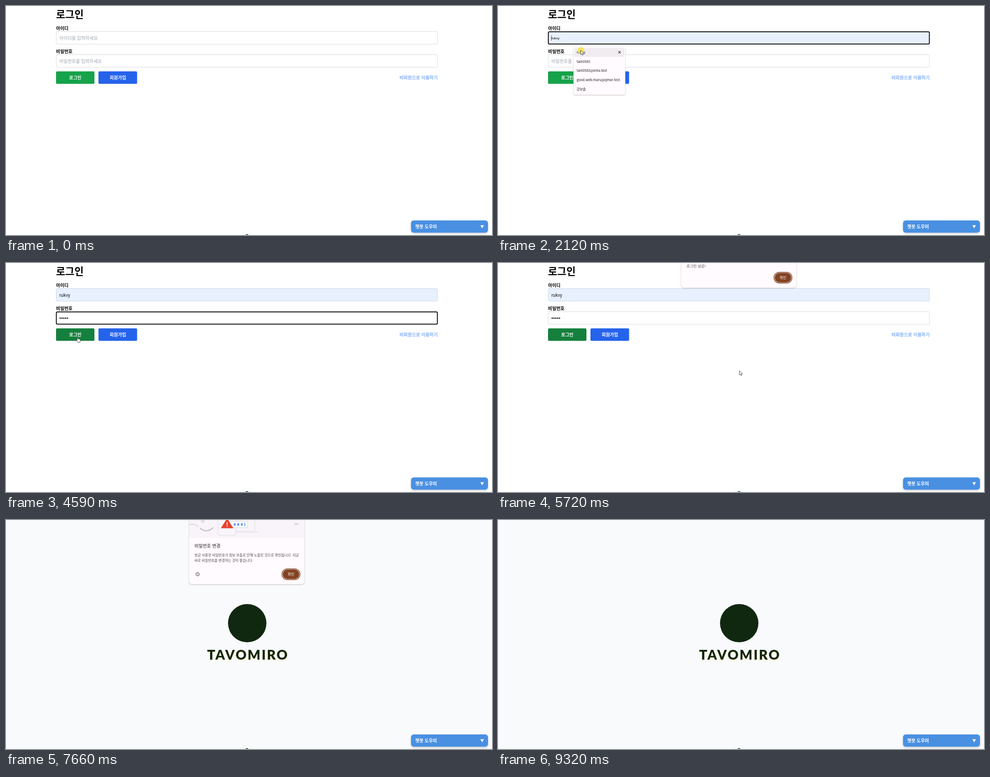
These frames come from a looping animation (1088x515 px, 9.86 s). An HTML page:

```html
<!DOCTYPE html>
<html lang="ko">
<head>
<meta charset="utf-8">
<title>로그인</title>
<style>
  html, body { margin: 0; width: 100%; height: 100%; overflow: hidden; background: #fff; }
  svg { display: block; width: 100%; height: 100%; }
  text { font: 10px "Noto Sans CJK KR", "Noto Sans CJK", "Noto Sans", sans-serif; white-space: pre; }
  .bold { font-weight: 700; }
  .mid { text-anchor: middle; }
  .white { fill: #fff; }
  .hint { fill: #9ca3af; }
  .field { fill: #fff; stroke: #d5d9de; }
  .field.filled { fill: #e8f0fe; stroke: #c9d8e8; }
  .ring { fill: none; stroke: #101014; stroke-width: 2; }
  .caret { stroke: #222; stroke-width: .8; }
  .list text { font-size: 7.5px; fill: #1f1b1f; }
  .panel { fill: #fffbff; }
  .small { font-size: 7.7px; fill: #4d4448; }
  .ok { --pill: #834323; }
  .ok.over { --pill: #925330; }
  .pill { fill: var(--pill); }
  .halo { fill: #fffbff; stroke: #834323; stroke-width: 1.5; }
  .okText { font-size: 8px; fill: #fff; }
  .art { fill: none; stroke: #dcdce0; }
  .brand { font: 900 30px Lato, sans-serif; letter-spacing: 2.5px; fill: #10280f; }
</style>
</head>
<body>
<svg viewBox="0 0 1088 515" preserveAspectRatio="none">
  <defs>
    <filter id="shade" x="-10%" y="-20%" width="120%" height="150%">
      <feDropShadow dx="0" dy="1" stdDeviation="1.3" flood-color="#5c3020" flood-opacity=".4"/>
    </filter>
    <filter id="soft" x="-10%" y="-40%" width="120%" height="200%">
      <feDropShadow dx="0" dy="2" stdDeviation="2.3" flood-color="#000" flood-opacity=".2"/>
    </filter>
    <filter id="glow" x="-10%" y="-30%" width="120%" height="170%">
      <feDropShadow dx="0" dy="2" stdDeviation="1.2" flood-color="#efd98c" flood-opacity=".6"/>
    </filter>
    <clipPath id="banner"><rect x="410" y="-5" width="258" height="45"/></clipPath>
    <g id="okShape">
      <rect class="halo" x="617.8" y="20.8" width="40.4" height="24.4" rx="12.2"/>
      <rect class="pill" x="619.5" y="22.3" width="37" height="21.4" rx="10.7"/>
      <text class="okText mid" x="638" y="35.9">확인</text>
    </g>
  </defs>

  <rect id="back" width="1088" height="515" fill="#fff"/>

  <g id="login">
    <text class="bold" x="112" y="27" style="font-size:22.4px">로그인</text>
    <text class="bold" x="112" y="54">아이디</text>
    <rect id="idField" class="field" x="112.5" y="57.5" width="853.5" height="28.3" rx="2.5"/>
    <text id="idHint" class="hint" x="119.5" y="75.7">아이디를 입력하세요</text>
    <text id="idPreview" x="119.5" y="75.3" style="font:7.5px 'Liberation Sans',sans-serif">rukvy</text>
    <text id="idText" x="119.5" y="75.7" style="font-size:9.3px">rukvy</text>
    <rect id="idRing" class="ring" x="112.7" y="58" width="853" height="27.5" rx="2.5"/>
    <line id="idCaret" class="caret" y1="66.5" y2="78"/>

    <text class="bold" x="112" y="106">비밀번호</text>
    <rect class="field" x="112.5" y="109.5" width="853.5" height="28.3" rx="2.5"/>
    <text id="pwHint" class="hint" x="119.5" y="127.5">비밀번호를 입력하세요</text>
    <g id="dots"></g>
    <rect id="pwRing" class="ring" x="112.7" y="110" width="853" height="27.5" rx="2.5"/>
    <line id="pwCaret" class="caret" y1="118" y2="130"/>

    <rect id="loginBtn" x="112" y="147" width="86" height="28" rx="2.5"/>
    <text class="bold white mid" x="155" y="164.7">로그인</text>
    <rect id="joinBtn" x="207" y="147" width="86.5" height="28" rx="2.5"/>
    <text class="bold white mid" x="250.5" y="164.7">회원가입</text>
    <text x="966.5" y="164.7" text-anchor="end" fill="#3b82f6">비회원으로 이용하기</text>
  </g>

  <g id="home">
    <circle cx="540" cy="232" r="43" fill="#10280f"/>
    <text class="brand mid" x="541.5" y="314" filter="url(#glow)">TAVOMIRO</text>
  </g>

  <circle cx="540" cy="516.5" r="9" fill="#fff" filter="url(#soft)"/>
  <circle cx="539.5" cy="517" r="4" fill="#2c5a50"/>

  <rect x="906.7" y="482.3" width="172.3" height="27.5" rx="6" fill="#4a90e2" filter="url(#soft)"/>
  <text class="bold white" x="916" y="499.8">챗봇 도우미</text>
  <path class="white" d="M1062 493h8l-4 7z"/>

  <g id="list" class="list">
    <rect class="panel" x="169" y="92" width="116" height="107.5" rx="4" filter="url(#shade)"/>
    <g id="firstRow">
      <rect x="171" y="94" width="112" height="20.5" rx="2" fill="#f1ecf0"/>
      <path d="M269.5 101.5l5 5m0-5l-5 5" stroke="#333" stroke-width="1.1"/>
    </g>
  </g>

  <g id="alert">
    <rect class="panel" x="410" y="-20" width="258" height="75.5" rx="7" filter="url(#shade)"/>
    <text class="small" x="422" y="9.8" style="font-size:8.2px">로그인 성공!</text>
    <g id="alertOk" class="ok"><use href="#okShape"/></g>
  </g>

  <g id="advice">
    <rect class="panel" x="410" y="-20" width="258" height="164.5" rx="7" filter="url(#shade)"/>
    <g clip-path="url(#banner)">
      <rect x="410" y="-5" width="258" height="45" fill="#f8f4f9"/>
      <path class="art" stroke-width="2.5" d="M410 11q11-5 20 4"/>
      <path class="art" stroke-width="2.5" style="stroke:#c3c4c8" d="M434 18q15 13 30-1"/>
      <path class="art" stroke-width="1.8" d="M440.5-3v11m-5-8l10 5m0-5l-10 5"/>
      <path d="M645 11q0-5 5-5t5 5z" fill="#dcdce0"/>
      <rect class="art" x="514" y="-8" width="43" height="33"/>
      <path class="art" d="M500 27.5h65"/>
      <rect class="art" x="475" y="-8" width="39" height="42" rx="3" style="fill:#f8f6fa"/>
      <rect x="497" y="3" width="44" height="14" fill="#fff" stroke="#cfd6e4"/>
      <path id="stars" fill="none" stroke="#3f7de8" stroke-width="1.4"/>
      <path d="M495-4l14 22.5h-28z" fill="#e8432f"/>
      <path d="M495 5v6.5m0 1.5v2" stroke="#fff" stroke-width="1.8"/>
    </g>
    <text x="422" y="61.6" fill="#1f1b1f">비밀번호 변경</text>
    <text class="small" x="422" y="82">방금 사용한 비밀번호가 정보 유출로 인해 노출된 것으로 확인됩니다. 지금</text>
    <text class="small" x="422" y="93.7">바로 비밀번호를 변경하는 것이 좋습니다.</text>
    <circle cx="429" cy="122" r="3.8" fill="none" stroke="#333"/>
    <path d="M429 121.5v2.5m0-4.5v1" stroke="#333"/>
    <g id="adviceOk" class="ok" transform="translate(0 89)"><use href="#okShape"/></g>
  </g>

  <g id="pointer">
    <circle id="press" cx=".5" cy=".5" r="7.5" fill="#f7e21d" opacity=".7"/>
    <path id="arrow" d="M0 0v9.8l2.300-2 1.5 3.4 1.7-.7-1.5-3.300h3z" fill="#fff" stroke="#222" stroke-width=".8"/>
    <path id="beam" d="M-2-4.5q2 0 2 1.5v6q0 1.5-2 1.5m4-9q-2 0-2 1.5m0 6q0 1.5 2 1.5" fill="none" stroke="#333" stroke-width=".9"/>
    <path id="hand" d="M-.8 0q.8-1 1.6 0v4.5l4 .8q1.4.4 1.1 2l-.8 5h-5l-3.3-4.5q-.6-1.3.6-1.3l1.800 1.300z" fill="#fff" stroke="#222" stroke-width=".8"/>
  </g>
</svg>
<script>
const LOOP = 9860;
const NS = 'http://www.w3.org/2000/svg';
const $ = id => document.getElementById(id);
const show = (id, on) => { $(id).style.display = on ? '' : 'none'; };
const between = (t, a, b) => t >= a && t < b;

function add(parent, tag, attrs, label = '') {
  const el = document.createElementNS(NS, tag);
  for (const key in attrs) el.setAttribute(key, attrs[key]);
  el.textContent = label;
  return $(parent).appendChild(el);
}

function moveCaret(id, x) {
  $(id).setAttribute('x1', x);
  $(id).setAttribute('x2', x);
}

['rukvy', 'tam0583', 'tam0583@ema.test', 'good.web.maru@qmor.test', '강보솔']
  .forEach((label, i) => add('list', 'text', { x: 176, y: 107 + 20.7 * i }, label));
const dots = [0, 1, 2, 3, 4].map(i => add('dots', 'circle', { cx: 121.3 + 4.1 * i, cy: 124, r: 1.5 }));
$('stars').setAttribute('d',
  [512, 520, 528].map(x => `M${x} 7v6m-2.6-4.5l5.2 3m0-3l-5.2 3`).join('') + 'M534.5 6v8');

// Pointer stops: time, x, y
const stops = [
  [70, 330, 355], [700, 200, 76], [1060, 196, 78], [1500, 190, 113], [1990, 185, 99.5],
  [2450, 185, 99.5], [2740, 211, 130], [3380, 211, 130], [3520, 215.5, 139], [3680, 215.5, 139],
  [3980, 232, 183], [4560, 160.5, 166], [5400, 160.5, 166], [5940, 754, 285], [6390, 632, 53],
  [6660, 634, 36], [7100, 634, 36], [7400, 640, -16], [8060, 660, -16], [8400, 638, 121],
  [8600, 638, 121], [9010, 1026, 495], [9120, 1074, 500], [9320, 1090, 514]
];
const clicks = [[820, 930], [2110, 2250], [2740, 2850], [4730, 4800], [6870, 7080], [8480, 8600]];

function pointerAt(t) {
  const i = stops.findIndex(s => s[0] > t);
  if (i < 1) return [-50, -50];
  const [t0, x0, y0] = stops[i - 1], [t1, x1, y1] = stops[i];
  const u = (t - t0) / (t1 - t0), k = u * u * (3 - 2 * u);
  return [x0 + (x1 - x0) * k, y0 + (y1 - y0) * k];
}

function draw(t) {
  const [x, y] = pointerAt(t);
  const over = (l, tp, r, b) => x >= l && x <= r && y >= tp && y <= b;
  const home = t >= 7220;
  const listOpen = between(t, 900, 2250);
  const page = t < 5460;

  $('back').setAttribute('fill', home ? '#f8fafc' : '#fff');
  show('login', !home);
  show('home', home);
  show('alert', between(t, 5460, 7080));
  show('advice', between(t, 7450, 8620));
  show('list', listOpen);

  // Name field
  const preview = between(t, 1300, 2250), filled = t >= 2250;
  $('idField').classList.toggle('filled', preview || filled);
  show('firstRow', preview);
  show('idHint', !preview && !filled);
  show('idPreview', preview);
  show('idText', filled);
  show('idRing', between(t, 840, 2750));
  show('idCaret', between(t, 840, 2750) && (t - 840) % 1060 < 530);
  moveCaret('idCaret', filled ? 141 : 119.7);

  // Password typing
  const typed = Math.max(0, Math.min(5, Math.floor((t - 2890) / 130) + 1));
  dots.forEach((dot, i) => { dot.style.display = i < typed ? '' : 'none'; });
  show('pwHint', !typed);
  show('pwRing', between(t, 2750, 4800));
  show('pwCaret', between(t, 2750, 3980));
  moveCaret('pwCaret', 119.6 + 4.1 * typed);

  // Hover colours
  const onLogin = page && over(112, 147, 198, 175);
  const onJoin = page && over(207, 147, 293, 175);
  $('loginBtn').setAttribute('fill', onLogin || !page ? '#15803d' : '#16a34a');
  $('joinBtn').setAttribute('fill', onJoin ? '#1d4ed8' : '#2563eb');
  $('alertOk').classList.toggle('over', over(619, 22, 657, 44));
  $('adviceOk').classList.toggle('over', over(619, 111, 657, 133));

  const beam = page && !(listOpen && over(169, 92, 285, 200)) &&
    (over(112, 57, 966, 86) || over(112, 109, 966, 138));
  const hand = onLogin || onJoin || over(907, 482, 1079, 510);
  show('beam', beam);
  show('hand', hand);
  show('arrow', !beam && !hand);
  show('press', clicks.some(([a, b]) => between(t, a, b)));
  $('pointer').setAttribute('transform', `translate(${x} ${y})`);
}

const start = performance.now();
function tick() {
  draw((performance.now() - start) % LOOP);
  requestAnimationFrame(tick);
}
tick();
</script>
</body>
</html>
```
